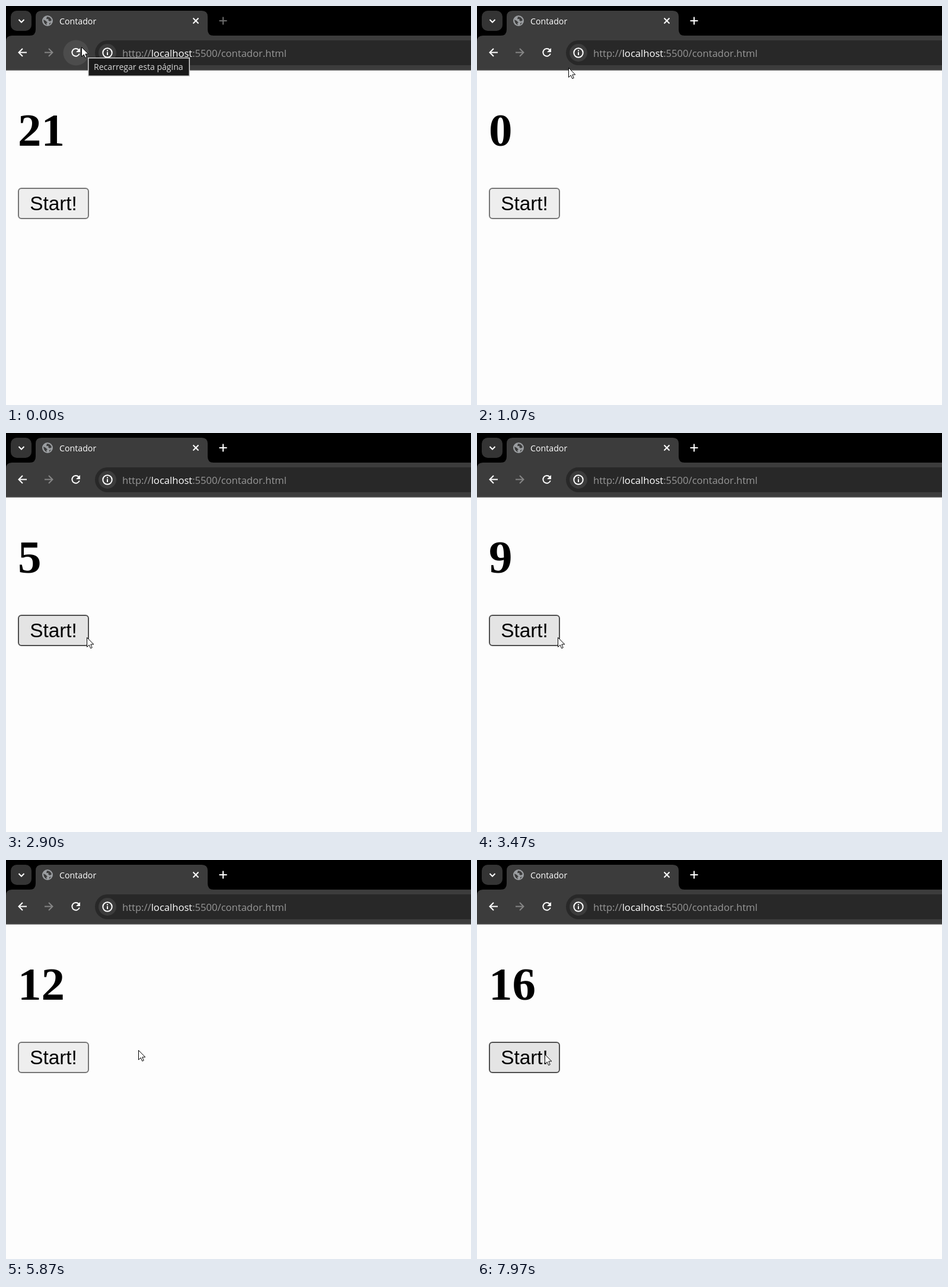
These frames come from a looping animation (784 by 674 pixels, 8 s). An HTML page:

```html
<!DOCTYPE html>
<html lang="pt">
<head>
<meta charset="utf-8">
<title>Contador</title>
<style>
  html, body { margin: 0; width: 100%; height: 100%; overflow: hidden; background: #fdfdfd; }
  svg { display: block; }
  .ui { font-family: "Open Sans", "Noto Sans", sans-serif; }
  .icon { fill: none; stroke: #fff; stroke-width: 2; }
  #count { font: bold 79px "Liberation Serif", serif; }
  #label { font: 33.33px "Liberation Sans", sans-serif; }
</style>
</head>
<body>
<svg width="784" height="674" viewBox="0 0 784 674">
  <rect width="784" height="108" fill="#000"/>

  <!-- tab strip and toolbar -->
  <rect x="8" y="8" width="35" height="34" rx="10" fill="#343434"/>
  <path class="icon" d="M21.5 23l4.5 4.5 4.5-4.5"/>
  <path fill="#3c3c3c" d="M0 109V60Q0 50 10 50H40Q50 50 50 40V18Q50 8 60 8H330Q340 8 340 18V40Q340 50 350 50H784V109Z"/>
  <path fill="#5c5c5c" d="M0 107.5H784V109H0Z"/>
  <g transform="translate(70 25)">
    <circle r="9" fill="#9a9da0"/>
    <path fill="#3c3c3c" d="M-7-2L-3 0 0 3-2 4-1 7Q-6 6-7-2ZM-1-7Q5-7 7-1L4 1 1-1 2-3-2-3ZM3 4L6 3 3 7Z"/>
  </g>
  <text class="ui" x="90" y="31" font-size="14.2" fill="#fff">Contador</text>
  <path class="icon" d="M315.5 20.5l9 9m0-9l-9 9"/>
  <path id="plus" class="icon" d="M359.5 25h13m-6.5-6.5v13"/>

  <circle id="reloadHover" cx="118" cy="79" r="21.5" fill="#4c4c4c"/>
  <path class="icon" d="M35 78.5H22M28 72l-6.5 6.5 6.5 6.5"/>
  <path class="icon" style="stroke:#858585" d="M65 78.5h13M72 72l6.5 6.5-6.5 6.5"/>
  <path class="icon" d="M122.5 74A6.4 6.4 0 1 0 123.8 80.5"/>
  <path fill="#fff" d="M125 71v7h-7Z"/>

  <path fill="#282828" d="M784 58H171a21 21 0 0 0 0 42H784Z"/>
  <circle cx="171" cy="79" r="15" fill="#3c3c3c"/>
  <circle class="icon" cx="171" cy="79" r="7.7"/>
  <path fill="#fff" d="M170 74.5h2v2h-2ZM170 78h2v5h-2Z"/>
  <text class="ui" x="196" y="86" font-size="16.6" fill="#979797">http://<tspan fill="#fff">localhost</tspan>:5500/contador.html</text>

  <!-- page -->
  <text id="count" x="20" y="235.5"></text>
  <rect id="button" x="21" y="308" width="118" height="51" rx="5" stroke-width="2"/>
  <text id="label" x="80" y="345" text-anchor="middle">Start!</text>

  <g id="tooltip">
    <rect x="138.75" y="87.75" width="170.5" height="30.5" fill="#1a1a1a" stroke="#d8d8d8" stroke-width="1.5"/>
    <text class="ui" x="148" y="108" font-size="14.1" fill="#dadada">Recarregar esta página</text>
  </g>
  <path id="cursor" fill="#fff" stroke="#000" d="M.5.5V16.5L4.2 13 6.7 18.7 9.2 17.6 6.8 12H11.8Z"/>
</svg>

<script>
  const LOOP = 8000;
  const RELOAD = 360;
  const CLICK_INTERVAL = 130;

  // Where the pointer pauses or turns: time, x, y
  const stops = [
    [640, 127, 69], [1070, 154, 104], [1700, 158, 325], [1820, 132, 345],
    [2050, 160, 393], [2330, 153, 355], [2500, 136, 345], [3600, 136, 345],
    [4400, 160, 365], [5000, 215, 270], [5870, 223, 321], [7070, 160, 327],
    [7970, 114, 328]
  ];

  const byId = id => document.getElementById(id);
  const show = (id, visible) => byId(id).setAttribute("visibility", visible ? "visible" : "hidden");
  const ease = k => k * k * (3 - 2 * k);

  function pointerAt(t) {
    const next = stops.findIndex(stop => stop[0] > t);
    if (next === 0) return stops[0].slice(1);
    if (next < 0) return stops[stops.length - 1].slice(1);
    const [t0, x0, y0] = stops[next - 1];
    const [t1, x1, y1] = stops[next];
    const k = ease((t - t0) / (t1 - t0));
    return [Math.round(x0 + (x1 - x0) * k), Math.round(y0 + (y1 - y0) * k)];
  }

  const overButton = ([x, y]) => x >= 20 && x < 140 && y >= 307 && y < 360;

  // The button is clicked at a steady pace while the pointer is on it
  function countAt(t) {
    if (t < RELOAD) return 21;
    let clicks = 0;
    for (let tick = 0; tick <= t; tick += CLICK_INTERVAL) {
      if (overButton(pointerAt(tick))) clicks++;
    }
    return clicks;
  }

  function draw(now) {
    const t = now % LOOP;
    const [x, y] = pointerAt(t);
    const hover = overButton([x, y]);
    byId("cursor").setAttribute("transform", `translate(${x} ${y})`);
    byId("count").textContent = countAt(t);
    byId("button").setAttribute("fill", hover ? "#e4e4e4" : "#eeeeee");
    byId("button").setAttribute("stroke", hover ? "#4f4f4f" : "#767676");
    byId("plus").style.stroke = t < RELOAD ? "#6b6b6b" : "#fff";
    show("tooltip", t < RELOAD);
    show("reloadHover", Math.hypot(x - 118, y - 79) < 21.5);
    requestAnimationFrame(draw);
  }
  requestAnimationFrame(draw);
</script>
</body>
</html>
```
